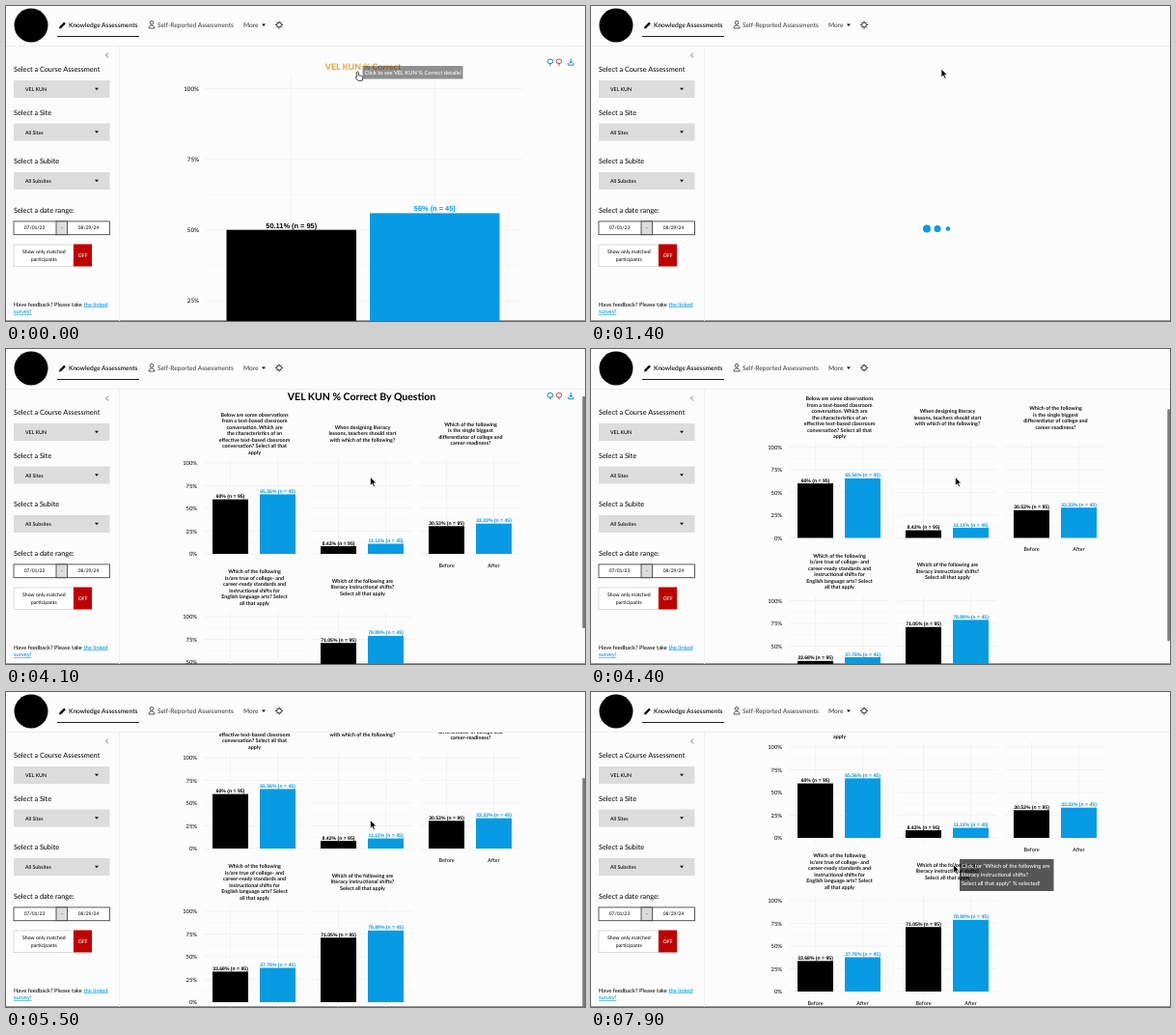
An HTML page that plays this animation: 600 by 326 pixels, repeating every 8000 ms.

```html
<!DOCTYPE html>
<html lang="en">
<head>
<meta charset="utf-8">
<title>Assessment dashboard</title>
<style>
  html, body { margin: 0; width: 100%; height: 100%; overflow: hidden; background: #fcfcfc; }
  svg { display: block; width: 600px; height: 326px; font-family: Lato, sans-serif; font-weight: 500; text-rendering: geometricPrecision; }
  .label { font-family: "Liberation Sans", Arial, sans-serif; }
</style>
</head>
<body>
<svg id="stage" viewBox="0 0 600 326"></svg>
<script>
const LOOP = 8000, STEP = 100;
const BLUE = '#069be3', BLACK = '#000', INK = '#111', PAPER = '#fcfcfc';
const COURSE = 'VEL KUN';

// Markup helpers; text is centred vertically on y.
const rect = (x, y, w, h, fill, extra = '') =>
  `<rect x="${x}" y="${y}" width="${w}" height="${h}" fill="${fill}" ${extra}/>`;
const text = (x, y, size, str, { fill = INK, anchor = 'start', extra = '' } = {}) =>
  `<text x="${x}" y="${y + size * 0.35}" font-size="${size}" fill="${fill}" text-anchor="${anchor}" ${extra}>${str}</text>`;
const path = (d, stroke, width = 1, fill = 'none') =>
  `<path d="${d}" stroke="${stroke}" stroke-width="${width}" fill="${fill}"/>`;
const group = (id, body) => `<g id="${id}">${body}</g>`;
const caret = (x, y) => `<path d="M${x - 2} ${y - 1}h4l-2 2.4z" fill="${INK}"/>`;
const middle = (x, y, size, str, fill = INK, extra = '') =>
  text(x, y, size, str, { fill, anchor: 'middle', extra });

function grid({ left, right, top, bottom, zero, unit, columns }) {
  let out = '';
  for (let p = 0; p <= 100; p += 12.5) {
    const y = zero - p * unit;
    if (y < bottom) out += path(`M${left} ${y}H${right}`, p % 25 ? '#f6f6f6' : '#f0f0f0', 0.7);
  }
  return out + columns.map(x => path(`M${x} ${top}V${bottom}`, '#f0f0f0', 0.7)).join('');
}

function bar(x, width, zero, unit, percent, n, size, fill) {
  const top = zero - percent * unit;
  return rect(x, top, width, percent * unit, fill) +
    middle(x + width / 2, top - size * 0.62, size, `${percent}% (n = ${n})`, fill, 'class="label" font-weight="bold"');
}

function axis(x, zero, unit, size) {
  return [0, 25, 50, 75, 100].map(p =>
    text(x, zero - p * unit, size, p + '%', { anchor: 'end' })).join('');
}

function toolbar(y) {
  const bubble = (x, color) =>
    `<ellipse cx="${x}" cy="${y - 0.7}" rx="2.9" ry="2.3" fill="none" stroke="${color}"/>` +
    path(`M${x - 0.5} ${y + 1.5}l.8 2.4`, color);
  return bubble(564, '#1b87bd') + bubble(573, '#d8434e') +
    path(`M585.3 ${y - 3.5}v4.6m-1.8-1.8l1.8 1.8l1.8-1.8M582.8 ${y + 1}v2.2h5v-2.2`, '#1b87bd');
}

function overview() {
  const zero = 378.5, unit = 2.93;
  return grid({ left: 206, right: 535, top: 72, bottom: 326, zero, unit, columns: [295.5, 444.5] }) +
    axis(200, zero, unit, 6.2) +
    bar(228.5, 134.5, zero, unit, 50.11, 95, 7.4, BLACK) +
    bar(377, 134.5, zero, unit, 56, 45, 7.4, BLUE) +
    middle(370, 63, 8.9, COURSE + ' % Correct', '#efa12f', 'font-weight="bold"') + toolbar(58);
}

function facet(x, zero, titleY, title, before, after, ticks) {
  const unit = 0.94, lines = title.split('|');
  const heading = lines.map((line, i) =>
    middle(x + 0.5, titleY + (i - (lines.length - 1) / 2) * 6.5, 5.4, line, INK, 'font-weight="bold"')).join('');
  return heading +
    grid({ left: x - 52, right: x + 52, top: zero - 99, bottom: zero + 5, zero, unit, columns: [x - 24.5, x + 24.5] }) +
    bar(x - 43, 37, zero, unit, before, 95, 5.1, BLACK) +
    bar(x + 6, 37, zero, unit, after, 45, 5.1, BLUE) +
    (ticks ? middle(x - 24.5, zero + 12, 5.5, 'Before') + middle(x + 24.5, zero + 12, 5.5, 'After') : '');
}

function questions() {
  return middle(368.5, 59.7, 10.5, COURSE + ' % Correct By Question', BLACK, 'font-weight="bold"') + toolbar(58.5) +
    axis(198, 222, 0.94, 5.8) + axis(198, 381, 0.94, 5.8) +
    facet(257, 222, 97.5, 'Below are some observations|from a text-based classroom|conversation. Which are|the characteristics of an|effective text-based classroom|conversation? Select all that|apply', 60, 65.56) +
    facet(369, 222, 97.5, 'When designing literacy|lessons, teachers should start|with which of the following?', 8.42, 11.11) +
    facet(481, 222, 97.5, 'Which of the following|is the single biggest|differentiator of college and|career-readiness?', 30.53, 33.33, true) +
    facet(257, 381, 256.5, 'Which of the following|is/are true of college- and|career-ready standards and|instructional shifts for|English language arts? Select|all that apply', 33.68, 37.78, true) +
    facet(369, 381, 256.5, 'Which of the following are|literacy instructional shifts?|Select all that apply', 71.05, 78.89, true);
}

function header() {
  const sun = Array.from({ length: 8 }, (_, i) => {
    const c = Math.cos(i * Math.PI / 4), s = Math.sin(i * Math.PI / 4);
    return `M${283 + 2.6 * c} ${19.5 + 2.6 * s}L${283 + 4 * c} ${19.5 + 4 * s}`;
  }).join('');
  return rect(0, 0, 600, 41, PAPER) + path('M0 41.5H600', '#ececec') +
    `<circle cx="26" cy="20" r="17.5" fill="${BLACK}"/>` +
    path('M56.5 22L61 17.5', BLACK, 2.4) + path('M55.3 23.3l.5-2l1.5 1.5z', BLACK, 0.4, BLACK) +
    text(65, 19.5, 6.6, 'Knowledge Assessments', { fill: BLACK }) + path('M53 31.5H138', '#222', 1.2) +
    `<circle cx="151" cy="17.3" r="1.8" fill="none" stroke="#444" stroke-width=".9"/>` +
    path('M148 23c0-4 6-4 6 0z', '#444', 0.9) +
    text(157, 19.5, 6.6, 'Self-Reported Assessments', { fill: '#444' }) +
    text(246, 19.5, 6.6, 'More', { fill: '#444' }) + caret(267, 19.5) +
    `<circle cx="283" cy="19.5" r="2.4" fill="none" stroke="#222" stroke-width=".9"/>` + path(sun, '#222', 0.9);
}

function sidebar() {
  const select = (y, title, value) => text(8, y, 7.3, title) +
    rect(8, y + 11.5, 99.5, 18, '#dcdcdc') + text(20, y + 20.7, 5.3, value, { fill: BLACK }) + caret(94, y + 20.3);
  return rect(0, 42, 117, 283, PAPER) + path('M117.5 42V326', '#efefef') +
    path('M106 48.5l-2.5 2.5l2.5 2.5', '#555', 0.8) +
    select(65.5, 'Select a Course Assessment', COURSE) +
    select(110, 'Select a Site', 'All Sites') +
    select(160.5, 'Select a Subite', 'All Subsites') +
    text(8, 211, 7.3, 'Select a date range:') +
    rect(8, 222.9, 99.5, 13.8, '#fff', 'stroke="#333" stroke-width=".8"') +
    rect(52, 222.9, 11.5, 13.8, '#dcdcdc', 'stroke="#333" stroke-width=".8"') +
    middle(29.5, 229.7, 4.95, '07/01/23') + middle(58, 229.7, 4.95, '-') + middle(85.5, 229.7, 4.95, '08/29/24') +
    rect(8, 247, 62, 22.5, '#fff', 'stroke="#d8d8d8" stroke-width=".9"') +
    rect(70, 246.5, 19, 23, '#bf0000') + middle(79.7, 258, 5.2, 'OFF', '#fff') +
    middle(39.3, 254, 5.2, 'Show only matched') + middle(39.3, 262, 5.2, 'participants') +
    text(8, 308.5, 5.82, `Have feedback? Please take <tspan fill="${BLUE}" text-decoration="underline">the linked</tspan>`) +
    text(8, 316, 5.82, 'survey!', { fill: BLUE, extra: 'text-decoration="underline"' });
}

const tooltip = (x, y, w, h, lines) => rect(x, y, w, h, BLACK, 'fill-opacity=".66"') +
  lines.map((line, i) => text(x + 2, y + 6.8 + i * 9.2, 5.75, line, { fill: '#fff' })).join('');

const hand = path('M363.6 68.3q1-.9 1.8.3v3.2l3.4.7q1.3.4 1.1 1.8l-.7 3h-4.4l-2.6-3.4q0-1.1 1.4-.5z', '#222', 0.8, '#fff');
const arrow = path('M0 0V8.8L2 7L3.5 10.3L5 9.6L3.5 6.4H6.2Z', '#fff', 0.7, BLACK);

const stage = document.getElementById('stage');
stage.innerHTML = rect(0, 0, 600, 326, PAPER) + path('M0 325.5H600', '#999') +
  group('overview', overview()) + group('questions', questions()) +
  group('loader', [348, 359, 370].map(x => `<circle cx="${x}" cy="230.5" fill="${BLUE}"/>`).join('')) +
  sidebar() + header() +
  `<rect id="thumb" x="597.3" width="2.7" height="240" rx="1" fill="#7d7d7d"/>` +
  group('tipOverview', tooltip(369.5, 62, 104, 13.5, [`Click to see ${COURSE} % Correct details!`])) +
  group('tipQuestion', tooltip(382, 173, 97.5, 33,
    ['Click for "Which of the following are', 'literacy instructional shifts?', 'Select all that apply" % selected!'])) +
  group('hand', hand) + group('arrow', arrow);

const part = Object.fromEntries([...stage.querySelectorAll('[id]')].map(el => [el.id, el]));
const dots = [...part.loader.children];

// Linear interpolation through [time, value] points.
function track(t, points) {
  let [t0, v0] = points[0];
  for (const [t1, v1] of points) {
    if (t <= t1) return t1 === t0 ? v1 : v0 + (v1 - v0) * (t - t0) / (t1 - t0);
    [t0, v0] = [t1, v1];
  }
  return v0;
}

const smooth = u => 0.5 - 0.5 * Math.cos(Math.PI * Math.min(1, Math.max(0, u)));
const show = (el, opacity) => el.setAttribute('opacity', +opacity);
const place = (el, x, y) => el.setAttribute('transform', `translate(${x} ${y})`);

// Each dot swells and shrinks over 80% of its cycle.
function dotRadius(t, i) {
  const phase = ((t - 680 - i * 160 + 3600) % 1800) / 1800;
  const swell = smooth(phase < 0.4 ? phase / 0.4 : (0.8 - phase) / 0.4);
  return Math.max(0, 4 * (1 - 1.04 * (1 - swell)));
}

function draw(t) {
  const clicked = t >= 1000, loaded = t >= 3000;
  show(part.overview, !clicked);
  show(part.tipOverview, clicked ? 0 : track(t, [[0, 0.65], [200, 1]]));
  show(part.hand, !clicked);
  show(part.arrow, clicked);
  show(part.loader, clicked && !loaded);
  show(part.questions, loaded);
  dots.forEach((dot, i) => dot.setAttribute('r', dotRadius(t, i)));

  const scroll = track(t, [[4000, 0], [4100, 10], [4500, 32], [5100, 49], [5900, 71]]);
  place(part.questions, 0, -scroll);
  part.thumb.setAttribute('y', 41 + scroll * 0.8);
  show(part.thumb, t < 4100 ? 0 : track(t, [[6500, 1], [6700, 0]]));

  const first = smooth((t - 3200) / 700), second = smooth((t - 6800) / 500);
  place(part.arrow, 363 + 14.5 * first - 2 * second, 65 + 67.5 * first + 46 * second);
  show(part.tipQuestion, track(t, [[7300, 0], [7500, 1]]));
}

function tick(now) {
  draw(Math.floor(now % LOOP / STEP) * STEP);
  requestAnimationFrame(tick);
}
requestAnimationFrame(tick);
</script>
</body>
</html>
```
